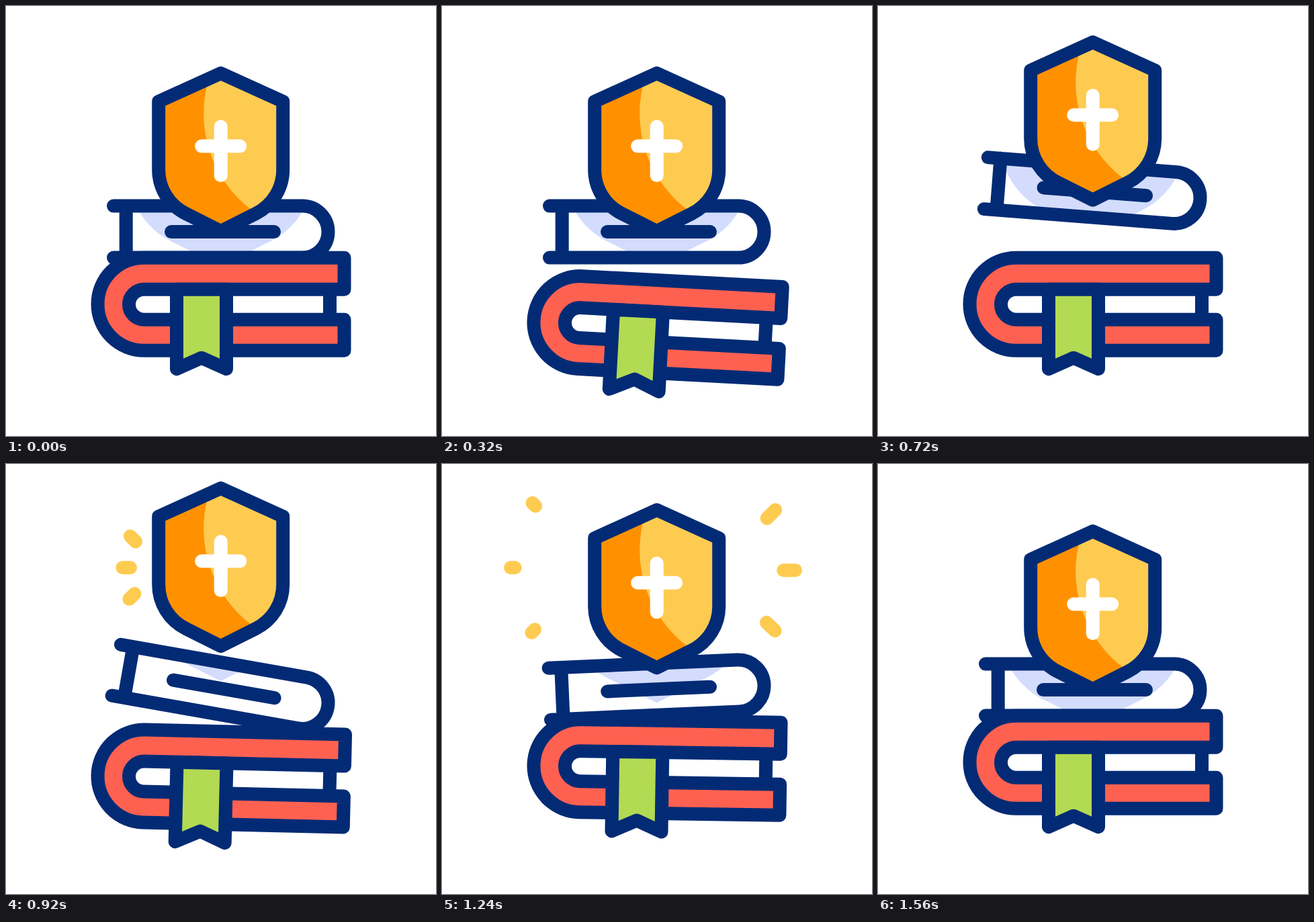
An HTML page that plays this animation: 640 by 640 pixels, repeating every 2000 ms.

```html
<!DOCTYPE html>
<html lang="en">
<head>
<meta charset="utf-8">
<title>Books and shield</title>
<style>
  @property --low-y  { syntax: "<length>"; inherits: true; initial-value: 0px; }
  @property --low-a  { syntax: "<angle>";  inherits: true; initial-value: 0deg; }
  @property --top-y  { syntax: "<length>"; inherits: true; initial-value: 0px; }
  @property --top-a  { syntax: "<angle>";  inherits: true; initial-value: 0deg; }
  @property --rise   { syntax: "<length>"; inherits: true; initial-value: 0px; }
  @property --head   { syntax: "<length>"; inherits: true; initial-value: 0px; }
  @property --tail   { syntax: "<length>"; inherits: true; initial-value: 0px; }

  html, body { margin: 0; width: 100%; height: 100%; overflow: hidden; background: #fff; }

  svg {
    display: block; width: 100vw; height: 100vh;
    --smooth: cubic-bezier(.333, 0, .667, 1);
    animation: low-y 2s var(--smooth) infinite, low-a 2s var(--smooth) infinite,
               top-y 2s var(--smooth) infinite, top-a 2s var(--smooth) infinite,
               rise 2s var(--smooth) infinite;
  }

  .line { fill: none; stroke: #032b75; stroke-width: 20; stroke-linecap: round; stroke-linejoin: round; }
  .low, .top, .shield { transform-origin: 0 0; }
  .low    { transform: translate(205.5px, calc(443.7px + var(--low-y))) rotate(var(--low-a)); }
  .top    { transform: translate(441px, calc(336.1px + var(--top-y))) rotate(var(--top-a)); }
  .shield { transform: translate(-.3px, calc(var(--rise) - .4px)); }

  .rays {
    fill: none; stroke: #fecb51; stroke-width: 20; stroke-linecap: round;
    stroke-dasharray: calc(var(--head) - var(--tail)) 300px;
    stroke-dashoffset: calc(0px - var(--tail));
  }
  .west { animation: west 2s linear infinite, west-tail 2s linear infinite, west-show 2s step-end infinite; }
  .east { animation: east 2s linear infinite, east-tail 2s linear infinite, east-show 2s step-end infinite; }

  /* lower book: dips twice */
  @keyframes low-y {
    0%, 23.5%, 39.5%, 65%, 100% { --low-y: 0px; }
    10.5% { --low-y: 45px; }
    52.25% { --low-y: 40px; }
  }
  @keyframes low-a {
    0%, 23.5%, 41.9%, 66.2%, 100% { --low-a: 0deg; }
    10.5% { --low-a: 5deg; }
    52.5% { --low-a: 4deg; }
  }

  /* upper book: tossed up, lands, settles */
  @keyframes top-y {
    0%, 20.95%, 76%, 100% { --top-y: 0px; }
    32.25% { --top-y: -60px; }
    53.4% { --top-y: 50px; }
    63.5% { --top-y: -9.5px; }
  }
  @keyframes top-a {
    0%, 20.95%, 76%, 100% { --top-a: 0deg; }
    33.75%, 35% { --top-a: 4.3deg; }
    46.5% { --top-a: 10deg; }
    62% { --top-a: -2.5deg; }
  }

  @keyframes rise {
    0%, 25.75%, 72.15%, 100% { --rise: 0px; }
    41.5%, 51.85% { --rise: -64px; }
  }

  @keyframes west      { 0%, 43.5%  { --head: 0px; } 61.75%, 100% { --head: 100px; } }
  @keyframes west-tail { 0%, 46.5%  { --tail: 0px; } 63.4%, 100%  { --tail: 100px; } }
  @keyframes west-show { 0%, 63.4%, 100% { opacity: 0; } 43.5% { opacity: 1; } }
  @keyframes east      { 0%, 46.25% { --head: 0px; } 64.05%, 100% { --head: 100px; } }
  @keyframes east-tail { 0%, 50.5%  { --tail: 0px; } 67.85%, 100% { --tail: 100px; } }
  @keyframes east-show { 0%, 67.85%, 100% { opacity: 0; } 46.25% { opacity: 1; } }
</style>
</head>
<body>
<svg viewBox="0 0 640 640">
  <defs>
    <path id="crest" d="M320 100.5L412.5 142.5V244A73 73 0 0 1 371.6 309.7L320 335.5L268.4 309.7A73 73 0 0 1 227.5 244V142.5Z"/>
    <clipPath id="pages">
      <path class="top" d="M-262 -38.5H0A38.5 38.5 0 0 1 0 38.5H-262Z"/>
    </clipPath>
  </defs>

  <g class="rays west">
    <path pathLength="100" d="M193 115.5L134.5 58"/>
    <path pathLength="100" d="M185 154.3H102"/>
    <path pathLength="100" d="M191.5 193L133.5 251"/>
  </g>
  <g class="rays east">
    <path pathLength="100" d="M446 118.5L502.5 62"/>
    <path pathLength="100" d="M455 158.3H535"/>
    <path pathLength="100" d="M445 198.5L502 254.5"/>
  </g>

  <!-- shadow of the shield on the pages -->
  <g clip-path="url(#pages)">
    <g class="shield">
      <use href="#crest" fill="#d3dcfd" stroke="#d3dcfd" stroke-width="93"/>
    </g>
  </g>

  <g class="top line">
    <path d="M-281 -38.5H0A38.5 38.5 0 0 1 0 38.5H-281M-262.3 -38.5V38.5M-195 0H-42"/>
  </g>

  <g class="shield">
    <use href="#crest" fill="#fecb51"/>
    <path fill="#ff9100" d="M302 109A180 180 0 0 0 366 304L320 335.5L268.4 309.7A73 73 0 0 1 227.5 244V142.5Z"/>
    <use href="#crest" class="line"/>
    <path class="line" style="stroke:#fff" d="M320 180V252.5M291.5 209H348.5"/>
  </g>

  <g class="low line">
    <path d="M276.5 -22V23"/>
    <path fill="#ff6151" d="M298 -69H0A69 69 0 0 0 0 69H298V23H0A22.5 22.5 0 0 1 0 -22H298Z"/>
    <path fill="#b2da53" d="M48.5 -22H122.5V96.5L85.5 80L48.5 96.5Z"/>
  </g>
</svg>
</body>
</html>
```
